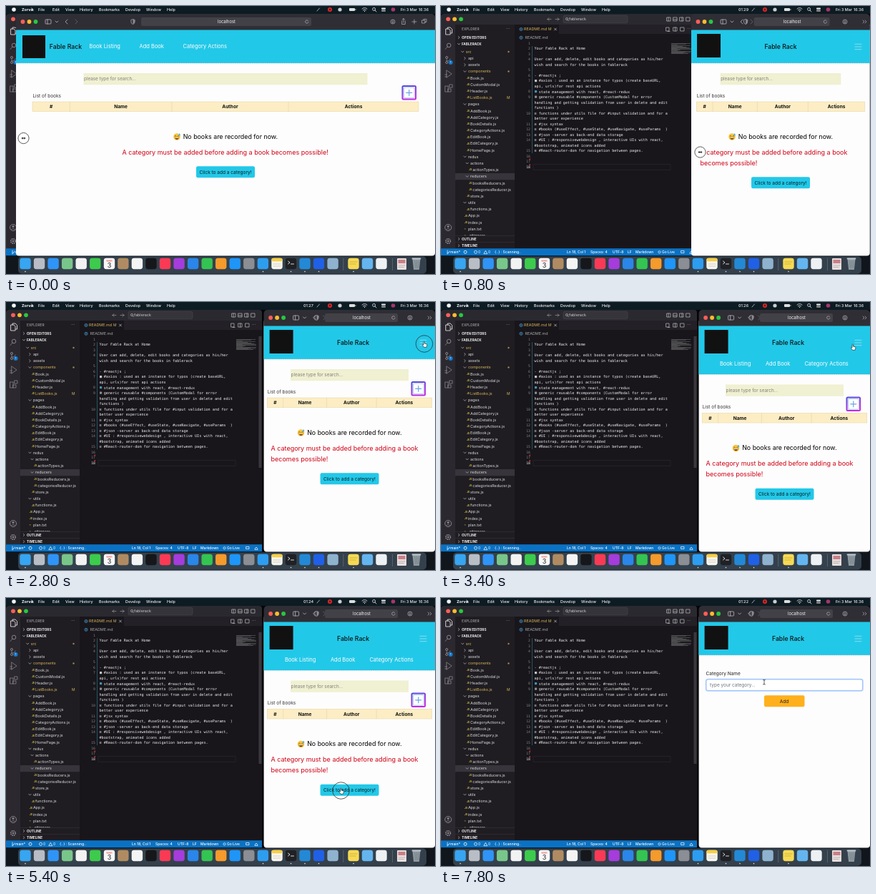
An HTML page that plays this animation: 600 px wide and 375 px high, repeating every 8 s.

```html
<!DOCTYPE html>
<html lang="en">
<head>
<meta charset="utf-8">
<title>Book list demo</title>
<style>
html, body { margin: 0; width: 100%; height: 100%; overflow: hidden; background: #000; }
svg { display: block; width: 100vw; height: 100vh; }
text { font-family: Inter, Roboto, sans-serif; white-space: pre; }
.mono { font-family: "DejaVu Sans Mono", monospace; }
</style>
</head>
<body>
<svg viewBox="0 0 600 375">
  <defs>
    <linearGradient id="frame" x1="0" y1="0" x2="0.4" y2="1">
      <stop offset="0" stop-color="#4a50d8"/><stop offset="1" stop-color="#c22ae0"/>
    </linearGradient>
  </defs>
  <g id="desk"></g>
  <g id="timer"></g>
  <g id="browser"></g>
  <g id="pointer"></g>
</svg>
<script>
const LOOP = 8000, STEP = 200;
const BRAND = 'Fable Rack', FOLDER = 'fablerack';
const CYAN = '#22c8e8';
const $ = id => document.getElementById(id);

// Drawing helpers; text is placed by its vertical middle.
const rect = (x, y, w, h, fill, r = 0, more = '') =>
  `<rect x="${x}" y="${y}" width="${w}" height="${h}" rx="${r}" fill="${fill}" ${more}/>`;
const dot = (x, y, r, fill, more = '') => `<circle cx="${x}" cy="${y}" r="${r}" fill="${fill}" ${more}/>`;
const line = (d, color, w = 0.8, more = '') =>
  `<path d="${d}" fill="none" stroke="${color}" stroke-width="${w}" stroke-linecap="round" ${more}/>`;
const text = (x, y, s, size, fill, more = '') =>
  `<text x="${x}" y="${y + size * 0.36}" font-size="${size}" fill="${fill}" ${more}>${s}</text>`;
const MID = 'text-anchor="middle"', MEDIUM = 'font-weight="500"', BOLD = 'font-weight="700"';
const lights = (x, y) => ['#ff5f57', '#febc2e', '#28c840'].map((c, i) => dot(x + 9 * i, y, 2.9, c)).join('');

// Value at p along [position, value] stops.
function along(p, stops, ease = k => k) {
  if (p <= stops[0][0]) return stops[0][1];
  for (let i = 1; i < stops.length; i++) {
    const [a, u] = stops[i - 1], [b, v] = stops[i];
    if (p <= b) return u + (v - u) * ease((p - a) / (b - a));
  }
  return stops[stops.length - 1][1];
}
const smooth = k => k * k * (3 - 2 * k);
// Layout value for a window edge at x: wide, middle and narrow.
const fit = (x, wide, middle, narrow) => along(x, [[14, wide], [232.5, middle], [360.6, narrow]]);

function menuBar() {
  const items = [[45, 'File'], [65, 'Edit'], [83, 'View'], [103, 'History'], [130, 'Bookmarks'],
    [167, 'Develop'], [196, 'Window'], [225, 'Help']];
  return rect(0, 0, 600, 11, '#0d1b23') + dot(11, 5, 2.8, '#f2f2f2') +
    text(22, 5, 'Zorvik', 5.4, '#fff', BOLD) +
    items.map(([x, s]) => text(x, 5, s, 5.4, '#f4f4f4', MEDIUM)).join('') +
    line('M435 7l3.5-4', '#9aa', 1) +
    dot(453, 5, 3, '#e02b2b') + dot(453, 5, 1.4, '#801010') + dot(467, 5, 2.6, '#c9ced0') +
    rect(480, 3, 8, 4, '#ddd', 1) + rect(488.5, 4, 0.8, 2, '#ddd') +
    line('M498 4q3.5-3 7 0M499.5 5.8q2-1.6 4 0', '#eee') + dot(501.5, 7.4, 0.7, '#eee') +
    dot(514.6, 4.4, 2, 'none', 'stroke="#eee" stroke-width=".8"') + line('M516 6l2 2', '#eee') +
    rect(525, 2.5, 6, 2.2, '#ddd', 1) + rect(525, 5.6, 6, 2.2, '#999', 1) +
    dot(541.5, 5, 2.8, '#a8356c') +
    text(552, 5, 'Fri 3 Mar', 5.4, '#f4f4f4', MEDIUM) + text(577, 5, '16:36', 5.4, '#f4f4f4', MEDIUM);
}

function activityBar() {
  const ink = '#85838a';
  return rect(0, 26, 20, 313, '#2b292f') +
    line('M7 32h4l2 2v6h-6zM9 32v-2h4l2.5 2.5v5.5h-2', '#f0f0f0') +
    dot(11, 55, 2.8, 'none', `stroke="${ink}"`) + line('M9 57l-3 3.5', ink) +
    dot(8, 72, 1.5, 'none', `stroke="${ink}"`) + dot(8, 79, 1.5, 'none', `stroke="${ink}"`) +
    line('M8 73.5v4M13 74q0 3-5 3', ink) + dot(13.5, 79, 3, '#1177cc') + text(13.5, 79, '1', 4, '#fff', MID) +
    line('M8 90l7 5-7 5zM5.5 96h3m-3 3h3', ink) +
    line('M6 112h4v8h-4zM10 116h4v4h-4zM12 110h4v4h-4z', ink) +
    dot(10, 310, 4.5, 'none', `stroke="${ink}"`) + dot(10, 308.6, 1.5, ink) + line('M7.3 313q2.7-3 5.4 0', ink) +
    dot(10, 329, 3.2, 'none', `stroke="${ink}" stroke-width="1.8" stroke-dasharray="1.6 .9"`) + dot(10, 329, 1.3, ink);
}

// Tree rows: depth digit, then "+" (open) or "-" (closed) for folders, then the name.
const TREE = ('0+src 1-api 1-assets 1+components 2Book.js 2CustomModal.js 2Header.js 2ListBooks.js 1+pages ' +
  '2AddBook.js 2AddCategory.js 2BookDetails.js 2CategoryActions.js 2EditBook.js 2EditCategory.js 2HomePage.js ' +
  '1+redux 2+actions 3actionTypes.js 2+reducers 3booksReducers.js 3categoriesReducer.js 2store.js ' +
  '1+utils 2functions.js 1App.js 1index.js 1plan.txt 1.gitignore').split(' ');

function chevron(x, y, open) {
  return line(open ? `M${x - 1.6} ${y - 0.8}l1.6 1.7 1.6-1.7` : `M${x - 0.8} ${y - 1.6}l1.7 1.6-1.7 1.6`, '#bbb', 0.7);
}

function sidebar() {
  const back = '#1f1d22';
  let out = rect(20, 26, 83, 313, back) + text(29, 32.2, 'EXPLORER', 4.8, '#b5b5b5') +
    text(91, 32, '···', 6, '#ccc') + rect(20, 234, 83, 9.2, '#37353b');
  const section = (y, s, open) => chevron(25, y, open) + text(29, y, s, 4.7, '#eee', BOLD);
  out += section(44, 'OPEN EDITORS') + section(53.2, FOLDER.toUpperCase(), true);
  TREE.forEach((row, i) => {
    const depth = +row[0], mark = row[1], y = 64 + 9.18 * i;
    const folder = mark === '+' || mark === '-';
    const name = row.slice(folder ? 2 : 1);
    const hot = /^(src|components|ListBooks)/.test(name);
    const color = hot ? '#d9b65c' : '#dcdcdc';
    const x = 34.7 + 3.2 * depth;
    out += folder ? chevron(x - 4.5, y, mark === '+')
      : text(x - 5.2, y, /js$/.test(name) ? 'JS' : '≡', 3.4, '#d7c344', 'font-weight="600"');
    out += text(x, y, name, 5.4, color);
    if (hot) out += folder ? dot(94.5, y, 1.2, '#9c8745') : text(92, y, 'M', 5, color);
  });
  return out + rect(20, 321.5, 83, 18, back) + line('M20 321.5h83M20 330.5h83', '#3a383e', 0.5) +
    section(326, 'OUTLINE') + section(335.3, 'TIMELINE');
}

// Leading digits give the line number; rows without one are wrapped.
const README = `1|
2|Your ${BRAND} at Home
3|
4|User can add, delete, edit books and categories as his/her
|wish and search for the books in ${FOLDER}
5|
6|- #reactjs ;
7|* #axios : used as an instance for typos (create baseURL,
|api, urls)for rest api actions
8|* state management with react, #react-redux
9|* generic reusable #components (CustomModal for error
|handling and getting validation from user in delete and edit
|functions )
10|= functions under utils file for #input validation and for a
|better user experience
11|= #jsx syntax
12|= #books (#useEffect, #useState, #useNavigate, #useParams  )
13|= #json -server as back-end data storage
14|= #UI : #responsivewebdesign , interactive UIs with react,
|#bootstrap, animated icons added
15|= #React-router-dom for navigation between pages.
16|
17|
18|`.split('\n');

function editor() {
  const info = y => dot(112, y, 2, 'none', 'stroke="#4a9fd8" stroke-width=".8"') + dot(112, y, 0.7, '#4a9fd8');
  let out = rect(103, 26, 255, 313, '#18161b') + rect(103, 26, 255, 13, '#232127') + rect(103, 26, 62, 13, '#18161b') +
    info(32.5) + text(116, 32.5, 'README.md', 5.4, '#d9b65c') + text(150, 32.5, 'M', 5, '#d9b65c') +
    line('M158.5 31l3 3m0-3l-3 3', '#ccc', 0.7) +
    info(44.3) + text(117.5, 44.3, 'README.md', 5.4, '#a8a8a8') +
    line('M315 30h4v5h-4zM317 35.5h3M325 30h5v5h-5zM327.5 30v5M335 30h5v5h-5z', '#bbb', 0.7) + text(344, 32, '···', 6, '#bbb');
  out += rect(129, 221.7, 192, 7.5, 'none', 0, 'stroke="#2c2a30" stroke-width=".6"') + rect(353.5, 48, 4, 184, '#3a383e');
  const icons = ['#8f8f8f', '#c8c8c8', '#4a93b8'];
  README.forEach((row, i) => {
    const y = 51.9 + 7.53 * i, [num, body] = row.split('|');
    out += text(125, y, num, 4.8, num === '18' ? '#eee' : '#86848a', 'class="mono" text-anchor="end"');
    if (body[0] === '*') out += rect(131, y - 1.6, 3.2, 3.2, icons[num % 3], 0.8);
    out += text(130.5, y, body.replace(/^\*/, ' ').replace(/^=/, '≡'), 5.17, '#eee', 'class="mono"');
    if (i > 1 && i < 22 && body) out += rect(322, 49.5 + i * 0.85, 4 + body.length * 0.4, 0.5, '#777');
  });
  return out + rect(127.2, 56, 0.7, 150, '#2f6f7d') + rect(123.5, 213.5, 1.6, 2, '#b33') + rect(123.5, 221, 1.6, 2, '#b33');
}

function statusBar() {
  const items = [[13, 'main*'], [75, '{..} : Scanning..'], [176, 'Ln 18, Col 1'], [209, 'Spaces: 4'],
    [240, 'UTF-8'], [261, 'LF'], [272, 'Markdown'], [309, 'Go Live']];
  return rect(0, 339.3, 358, 10, '#0a72c4') + items.map(([x, s]) => text(x, 344.2, s, 5, '#fff', MEDIUM)).join('') +
    line('M9 342v5M9 346q3 0 3-3', '#fff', 0.7) + dot(34, 344.3, 2, 'none', 'stroke="#fff" stroke-width=".8"') +
    dot(48.5, 344.3, 2, 'none', 'stroke="#fff" stroke-width=".7"') + text(52, 344.2, '0', 5, '#fff') +
    line('M60 346.3l2.3-4 2.3 4z', '#fff', 0.7) + text(66, 344.2, '0', 5, '#fff') +
    dot(305.5, 344.3, 1.6, 'none', 'stroke="#fff" stroke-width=".7"') +
    line('M336 342.5h4v3h-4zM348 346q2-6 4 0z', '#fff', 0.7);
}

function dock() {
  const colors = ['#37a5f2', '#b9bdc6', '#2f94f7', '#79c68a', '#f2f2f2', '#3ccb4c', '', '#b08b62', '#f4f4f4', '#16171a',
    '#fa3a55', '#a53cdc', '#2a86e8', '#34c452', '#f59a2c', '#1e95f8', '#8b8e94', '#2d9df0', '', '', '#2389d7', '#2060e6', '#8fb2cf'];
  const icon = (x, fill) => rect(x - 7.7, 352.8, 15.4, 15.4, fill, 3.4);
  let out = rect(0, 349.5, 600, 26, '#10161c') + rect(17, 350.5, 571, 24, '#34414c', 5);
  colors.forEach((c, i) => { if (c) out += icon(27 + 19.55 * i, c); });
  out += icon(144.5, '#f8f8f8') + text(144.5, 356.5, 'MAR', 3.6, '#e53b35', MID) + text(144.5, 362.8, '3', 9, '#222', MID);
  out += icon(379, '#f7f5ec') + rect(371.3, 352.8, 15.4, 4.5, '#f7cf45', 2) + line('M374 361h10m-10 3h10', '#bbb', 0.6);
  out += icon(398.5, '#202124') + line('M394.5 357l2.5 2-2.5 2m4 0h4', '#eee', 0.9);
  out += icon(486, '#f6da55') + line('M481 358h10m-10 3h8', '#b89b2a', 0.6) + icon(505.5, '#64b5ef') + icon(525, '#eef1f4');
  out += rect(471.5, 353, 0.7, 17, '#66727c') + rect(540, 353, 0.7, 17, '#66727c');
  out += rect(547, 353, 13, 16, '#e9dede', 1) + rect(548.5, 355, 10, 5, '#c98088') + line('M549 363h9m-9 2.5h7', '#999', 0.6);
  out += '<path d="M568.5 354h11l-1.6 15h-7.8z" fill="#8d989f"/>' + rect(567.6, 352.6, 12.8, 2, '#c3cacf', 1) +
    line('M572 357l.6 9m2-9v9m2.7-9l-.6 9', '#6c787f', 0.6);
  [27, 359.5, 398.5, 418, 437.5, 486].forEach(x => out += dot(x, 371.6, 0.8, '#e4e4e4'));
  return out;
}

function desktop() {
  return rect(0, 0, 600, 375, '#050506') + rect(0, 11, 358, 338.5, '#2b2930', 4) + lights(10, 18.3) +
    line('M149 18.5h5m-5 0l2-2m-2 2l2 2M160 18.5h5m0 0l-2-2m2 2l-2 2', '#999', 0.7) +
    rect(171, 13.3, 90, 10.5, '#36343b', 2, 'stroke="#4d4b52" stroke-width=".5"') +
    dot(176, 18, 1.5, 'none', 'stroke="#bbb" stroke-width=".7"') + line('M177 19.3l1.4 1.4', '#bbb', 0.7) +
    text(191, 18.3, FOLDER, 5.4, '#ccc', MID) +
    line('M316 16h5v5h-5zM318 16v5M325 16h5v5h-5zM325 19h5M334 16h5v5h-5zM337 16v5M343 16h5v5h-5z', '#bbb', 0.7) +
    activityBar() + sidebar() + editor() + statusBar() + dock() + menuBar();
}

function toolbar(x, end) {
  const left = fit(x, 189, 345, 446), right = fit(x, 427, 495, 548), mid = (left + right) / 2;
  const ink = '#b9b7bd', slim = x > 300;
  let out = rect(x, 11, end - x, 24, '#302e35', 5) + rect(x, 28, end - x, 6, '#302e35') + lights(x + 9.5, 22) +
    rect(x + 41, 19, 8, 6, 'none', 1, `stroke="${ink}" stroke-width=".8"`) +
    line(`M${x + 44} 19v6M${x + 55} 21l2 2 2-2M${x + 72} 19l-3 3 3 3`, ink) +
    line(`M${x + 83} 19l3 3-3 3`, '#68666c');
  const sx = left - 11.5;
  out += `<path d="M${sx} 18.5l2.6.9v2.6q0 2.6-2.6 3.6q-2.6-1-2.6-3.6v-2.6z" fill="none" stroke="${ink}" stroke-width=".7"/>` +
    `<path d="M${sx} 18.5l2.6.9v2.6q0 2.6-2.6 3.6z" fill="#8c8a90"/>` +
    rect(left, 16, right - left, 12, '#434148', 2.5) + text(mid + 0.5, 22, 'localhost', 5.8, '#f4f4f4', MID) +
    line(`M${right - 4.5} 20.5a2.2 2.2 0 1 0 .5 2`, ink, 0.7);
  const download = dx => dot(dx, 22, 3, 'none', `stroke="${ink}" stroke-width=".7"`) +
    line(`M${dx} 20v3.5m-1.3-1.2l1.3 1.2 1.3-1.2`, ink, 0.7);
  out += slim
    ? download(565) + line('M590 20l2 2-2 2m3-4l2 2-2 2', ink, 0.7)
    : download(541) + line('M553.7 21v4.5h4.6v-4.5M556 23v-5.5m-1.6 1.6l1.6-1.6 1.6 1.6M568 22h6m-3-3v6', ink, 0.7) +
      line('M582 20h4v4h-4zM584 20v-1.6h4v4h-2', ink, 0.7);
  return out;
}

function header(x, end, open) {
  const slim = x > 300, h = 46.3 + 21.3 * open;
  const nav = (nx, y, gaps) => ['Book Listing', 'Add Book', 'Category Actions']
    .map((s, i) => text(nx + gaps[i], y, s, 7.5, '#fff', slim ? `opacity="${open}"` : '')).join('');
  let out = rect(x, 33.5, end - x, h, CYAN) +
    line(`M${x} ${33.5 + h}H${end}`, '#3f9fb3', 0.5, 'stroke-dasharray="1.5 1.5"');
  if (!slim) {
    return out + rect(x + 9, 41, 32, 32, '#111') +
      text(x + 46.8, 56.8, BRAND, 8.7, '#111', MEDIUM) + nav(x + 102.5, 56.6, [0, 70, 131]);
  }
  out += rect(x + 8, 39, 33, 33, '#111') + text(x + 125, 57, BRAND, 8.7, '#111', `${MID} ${MEDIUM}`) +
    line('M579 53.3h9m-9 3.7h9m-9 3.7h9', '#b4e8f3', 0.7);
  return open > 0.3 ? out + nav(x + 29.3, 86.6, [0, 64, 118.5]) : out;
}

function smiley(x, y) {
  return dot(x, y, 4.8, '#fbc63a') + line(`M${x - 3} ${y - 1}q1-1.4 2 0m2 0q1-1.4 2 0`, '#5b3a12', 0.7) +
    `<path d="M${x - 3} ${y + 0.8}h6q-.6 3-3 3t-3-3z" fill="#6b3517"/>` + rect(x - 2.5, y + 0.9, 5, 0.9, '#fff') +
    `<path d="M${x + 3.6} ${y - 5}q2.4 3.2 0 3.6q-2.4-.4 0-3.6z" fill="#45b4ee"/>`;
}

function listPage(x, open, button) {
  const mid = fit(x, 307, 414.5, 480.5), tw = fit(x, 540, 290.5, 230.5), sw = fit(x, 397, 210, 165);
  const left = mid - tw / 2, cols = [0, 0.097, 0.361, 0.663, 1];
  let out = rect(mid - sw / 2, 94, sw, 16.3, '#f0f0d2') +
    text(mid - sw / 2 + 0.5, 102, 'please type for search...', 6.35, '#80807a') +
    text(left + 0.4, 125.6, 'List of books', 6.5, '#333') +
    rect(left, 134, tw, 13.5, '#fdedc4', 0, 'stroke="#e6d6a6" stroke-width=".6"');
  ['#', 'Name', 'Author', 'Actions'].forEach((s, i) => {
    out += text(left + tw * (cols[i] + cols[i + 1]) / 2, 141, s, 6.6, '#111', `${MID} ${BOLD}`);
    if (i) out += line(`M${left + tw * cols[i]} 134.3v13`, '#e6d6a6', 0.6);
  });
  if (button) {
    const bx = fit(x, 553.5, 560, 566.5);
    out += rect(bx + 1, 112, 18.6, 18.6, '#fff', 1.5, 'stroke="url(#frame)" stroke-width="2"') +
      rect(bx + 3, 114, 14.6, 14.6, '#fff', 0.5, 'stroke="#8fb4f0" stroke-width=".7"') +
      line(`M${bx + 6.3} 121.3h8m-4-4v8`, '#6aa4e6', 1.2);
  }
  out += smiley(mid - 68, 183) + text(mid - 59.3, 182.4, 'No books are recorded for now.', 8.85, '#000');
  const warn = x < 200 ? ['A category must be added before adding a book becomes possible!']
    : x < 300 ? ['A category must be added before adding a book becomes', 'possible!']
      : ['A category must be added before adding a book', 'becomes possible!'];
  const wx = fit(x, 162.5, 274, 370.5);
  warn.forEach((s, i) => out += text(wx, 204.3 + 15 * i, s, 9, '#d00012'));
  const by = 209.3 + 15 * warn.length;
  out += rect(mid - 41, by, 82, 16, CYAN, 2.2) + text(mid, by + 7.9, 'Click to add a category!', 6.5, '#0c1c22', MID);
  if (x > 200 && x < 300) out += rect(x + 5, 345.8, 228, 2.2, '#8b8b8b', 1.1);
  return `<g transform="translate(0 ${21.5 * open})">${out}</g>`;
}

function formPage(focus) {
  return text(370.5, 105.8, 'Category Name', 6.5, '#222') +
    (focus ? rect(369.8, 112.8, 221, 18, '#bcd5fb', 3.5) : '') +
    rect(371, 114, 218.6, 15.6, '#fff', 2.5, `stroke="${focus ? '#86b7fe' : '#ced4da'}" stroke-width=".8"`) +
    text(376, 122, 'type your category...', 6.5, '#6c757d') +
    rect(452, 136.3, 56.5, 16, '#ffb01c', 2.2) + text(480, 144.4, 'Add', 6.6, '#222', MID);
}

const DRAG = [[0, 14], [200, 125], [400, 232.5], [600, 310], [800, 350], [1000, 360.6]];
const PATH_X = [[1000, 372.6], [1500, 480], [1800, 480], [2600, 585], [3000, 585], [3400, 576],
  [4000, 576], [5000, 468.5], [5700, 468.5], [6600, 452]];
const PATH_Y = [[0, 185], [400, 204.5], [1000, 204.5], [1500, 124], [1800, 124], [2600, 58.5], [3000, 58.5],
  [3400, 62.5], [4000, 62.5], [5000, 269.5], [5700, 269.5], [6600, 117.5]];

function pointer(t, edge) {
  const x = t < 1000 ? edge + along(t, [[0, 10.5], [400, 12.5]]) : along(t, PATH_X, smooth);
  const y = along(t, PATH_Y, smooth);
  if (t < 1100) {
    return dot(x, y, 7.6, '#fff', 'stroke="#333" stroke-width=".8"') +
      `<path d="M${x - 3} ${y}l2-1.7v1.2h2v-1.2l2 1.7-2 1.7v-1.2h-2v1.2z" fill="#222"/>`;
  }
  if (t >= 6400) return line(`M${x - 1.4} ${y - 3.2}q1.4 0 1.4 1q0-1 1.4-1M${x} ${y - 2.5}v5.4m-1.4.7q1.4 0 1.4-1q0 1 1.4 1`, '#222', 0.7);
  const pressed = (t >= 2600 && t < 3000) || (t >= 5200 && t < 5600);
  const hand = (t >= 2500 && t < 4200) || (t >= 4900 && t < 5700);
  const shape = hand
    ? `M${x - 1} ${y - 3}q.8-.8 1.4 0v2.6l3 .8q.8.4.4 2l-.8 2.4h-3.4l-2.3-3q0-1 1.7-.2z`
    : `M${x} ${y - 2.5}v6l1.4-1.2 1 2.2 1-.5-1-2h1.9z`;
  return (pressed ? dot(x, y, 11.8, 'none', 'stroke="#333" stroke-width=".8"') : '') +
    `<path d="${shape}" fill="${hand ? '#fff' : '#000'}" stroke="${hand ? '#111' : '#fff'}" stroke-width=".6"/>`;
}

function draw(t) {
  const edge = along(t, DRAG), end = fit(edge, 600, 597, 600);
  const form = t >= 5600;
  const open = form ? 0 : along(t, [[2850, 0], [3250, 1]], smooth);
  const left = 29 - Math.max(0, Math.floor((t - 100) / 1000));
  $('timer').innerHTML = t < 200 ? '' : text(416, 5, `01:${left}`, 5.4, '#f4f4f4', MEDIUM);
  $('browser').innerHTML = rect(edge, 24, end - edge, 325.5, '#fdfdfe', 4) + toolbar(edge, end) + header(edge, end, open) +
    (form ? formPage(t >= 6800) : listPage(edge, open, t < 200 || t >= 1000));
  $('pointer').innerHTML = pointer(t, edge);
}

$('desk').innerHTML = desktop();
let shown = -1;
function tick() {
  const t = Math.floor(performance.now() % LOOP / STEP) * STEP;
  if (t !== shown) draw(shown = t);
  requestAnimationFrame(tick);
}
tick();
</script>
</body>
</html>
```
